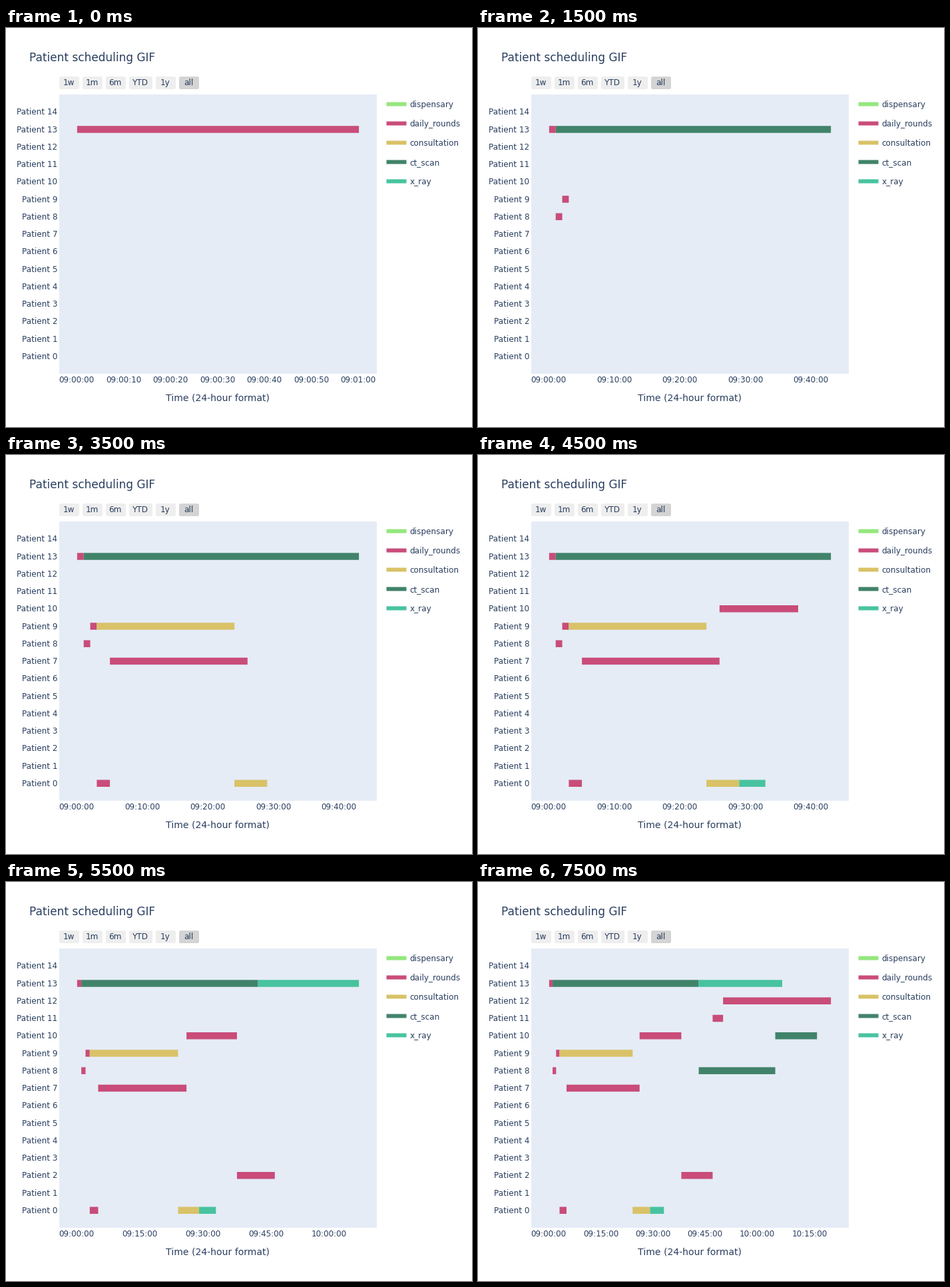
Recreate the animation shown at these times as a matplotlib script. Size 700 by 600 pixels, loop 8 s.

```python
import matplotlib.pyplot as plt
from matplotlib.animation import FuncAnimation
from matplotlib.patches import FancyBboxPatch, Rectangle

W, H, DPI = 700, 600, 100
LEFT, TOP, PLOT_W, PLOT_H = 80, 100, 477, 420
PAD = 26.85
ROW = PLOT_H / 16
INK = "#2a3f5f"
COLORS = {
    "dispensary": "#95e77e",
    "daily_rounds": "#c94c79",
    "consultation": "#d9c268",
    "ct_scan": "#41836a",
    "x_ray": "#48c39f",
}

# (patient, task, start minute, end minute), one added per step
SCHEDULE = [
    (13, "daily_rounds", 0, 1),
    (13, "ct_scan", 1, 43),
    (8, "daily_rounds", 1, 2),
    (9, "daily_rounds", 2, 3),
    (9, "consultation", 3, 24),
    (0, "daily_rounds", 3, 5),
    (7, "daily_rounds", 5, 26),
    (0, "consultation", 24, 29),
    (10, "daily_rounds", 26, 38),
    (0, "x_ray", 29, 33),
    (2, "daily_rounds", 38, 47),
    (13, "x_ray", 43, 67),
    (8, "ct_scan", 43, 65),
    (11, "daily_rounds", 47, 50),
    (12, "daily_rounds", 50, 81),
    (10, "ct_scan", 65, 77),
]
STEPS = (1 / 6, 10, 15)

plt.rcParams["font.family"] = "DejaVu Sans"
fig = plt.figure(figsize=(W / DPI, H / DPI), dpi=DPI, facecolor="white")
ax = fig.add_axes([0, 0, 1, 1])
ax.set_xlim(0, W)
ax.set_ylim(H, 0)
ax.axis("off")


def label(x, y, text, size=12, ha="left"):
    return ax.text(x, y, text, fontsize=size * 72 / DPI, color=INK,
                   ha=ha, va="baseline")


def rect(x, y, w, h, color):
    return ax.add_patch(Rectangle((x, y), w, h, fc=color, lw=0, snap=False))


def row_y(patient):
    return TOP + PLOT_H - ROW * (patient + 1)


def clock(minutes):
    s = round(minutes * 60)
    return f"{9 + s // 3600:02d}:{s // 60 % 60:02d}:{s % 60:02d}"


def draw_buttons():
    x = LEFT
    for name in ("1w", "1m", "6m", "YTD", "1y", "all"):
        w = 35 if name == "YTD" else 30
        color = "#d4d4d4" if name == "all" else "#eeeeee"
        ax.add_patch(FancyBboxPatch(
            (x, 73), w, 19, fc=color, lw=0,
            boxstyle="round,pad=0,rounding_size=2.5"))
        label(x + w / 2 - 0.8, 86, name, ha="center")
        x += w + 5


def draw_legend():
    for i, (name, color) in enumerate(COLORS.items()):
        y = 114.5 + 29 * i
        rect(571.54, y - 3, 30, 6, color)
        label(606.4, y + 4.68, name)


rect(LEFT, TOP, PLOT_W, PLOT_H, "#e5ecf6")
label(35, 50, "Patient scheduling GIF", 17)
label(LEFT + PLOT_W / 2 - 1, 561, "Time (24-hour format)", 14, "center")
for p in range(15):
    label(77.3, row_y(p) + 4.2, f"Patient {p}", ha="right")
draw_buttons()
draw_legend()

bars = [rect(0, row_y(p) - ROW / 5, 0, ROW * 2 / 5, COLORS[task])
        for p, task, _, _ in SCHEDULE]
ticks = [label(0, 533, "", ha="center") for _ in range(7)]


def update(n):
    shown = SCHEDULE[:n + 1]
    span = max(end for *_, end in shown)
    scale = (PLOT_W - 2 * PAD) / span
    x0 = LEFT + PAD

    for i, (bar, (_, _, start, end)) in enumerate(zip(bars, SCHEDULE)):
        bar.set_visible(i <= n)
        bar.set_x(x0 + start * scale)
        bar.set_width((end - start) * scale)

    step = next(s for s in STEPS if span / s <= 6 + 1e-9)
    count = int(span / step + 1e-9) + 1
    for i, tick in enumerate(ticks):
        tick.set_text(clock(i * step) if i < count else "")
        tick.set_x(x0 + i * step * scale - 0.8)
    return bars + ticks


anim = FuncAnimation(fig, update, frames=len(SCHEDULE), interval=500,
                     init_func=lambda: update(0), repeat=True,
                     repeat_delay=0, blit=False)
plt.show()
```
